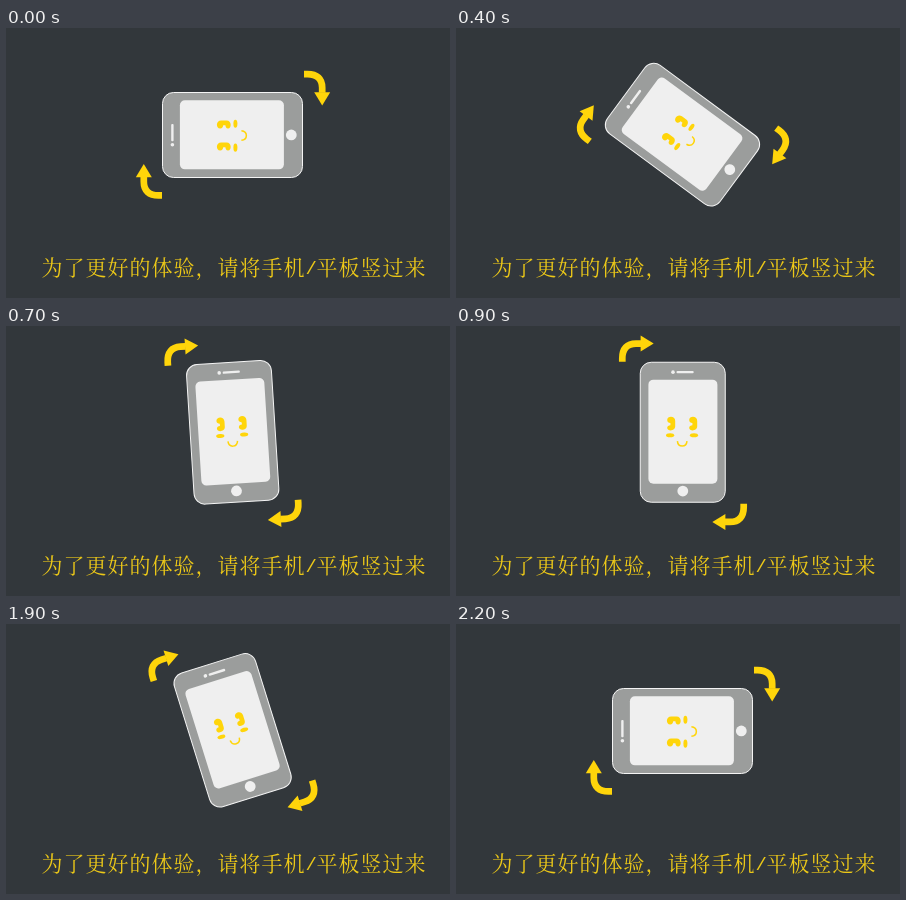
Write an HTML page that moves like this. It is 444 by 270 pixels and loops after 2900 ms.

```html
<!DOCTYPE html>
<html lang="zh-CN">
<head>
<meta charset="utf-8">
<title>请竖屏浏览</title>
<style>
  html, body { margin: 0; width: 100%; height: 100%; overflow: hidden; background: #32373b; }
  svg { display: block; width: 444px; height: 270px; }
  text { font: 300 21px "Noto Serif CJK SC", "Noto Sans CJK SC", "Noto Sans CJK", serif; letter-spacing: 1px; fill: #ecc818; }
  .slash { font: 19px "Liberation Mono", monospace; }
</style>
</head>
<body>
<svg viewBox="0 0 444 270">
  <defs>
    <!-- shapes are drawn around the centre of the upright phone -->
    <g id="arrow">
      <path d="M-60.7 -71V-74.5C-60.7 -84 -56 -89.2 -47 -89.2H-42" fill="none" stroke="#ffd50a" stroke-width="6.7"/>
      <path d="M-42.4 -97.2L-29.3 -89.2L-42.4 -81.2Z" fill="#ffd50a"/>
    </g>
    <path id="eye" d="M-3.8 -3.6C-3.8 -8 4.2 -8.2 4.2 -2.6V2.8C4.2 8 -3.8 8 -3.8 4.2C-3.8 2.4 -2.4 1.8 -.6 1.6V-.6C-2.4 -.8 -3.8 -1.6 -3.8 -3.6Z"/>
    <ellipse id="cheek" rx="4.1" ry="2"/>
  </defs>
  <rect width="444" height="270" fill="#32373b"/>
  <g id="device">
    <use href="#arrow"/>
    <use href="#arrow" transform="rotate(180)"/>
    <rect x="-42.75" y="-70.5" width="85" height="140" rx="11" fill="#9b9d9c" stroke="#f4f4f4"/>
    <rect x="-34.6" y="-53.1" width="69" height="104" rx="5" fill="#efefef"/>
    <g fill="#efefef">
      <circle cx="-10" cy="-60.6" r="1.8"/>
      <rect x="-6.5" y="-61.8" width="17.2" height="2.4" rx="1"/>
      <circle cx="-.2" cy="58.3" r="5.4"/>
    </g>
    <g fill="#ffd50a">
      <use href="#eye" x="-12" y="-9.2"/>
      <use href="#eye" x="10" y="-9.2"/>
      <use href="#cheek" x="-12.9" y="2.4"/>
      <use href="#cheek" x="11" y="2.4"/>
    </g>
    <path d="M-5.6 8.4C-5 15 3.4 15 4 8.4" fill="none" stroke="#ffd50a" stroke-width="1.5"/>
  </g>
  <text x="35.5" y="246.5">为了更好的体验，请将手机</text>
  <text x="299.5" y="246" class="slash">/</text>
  <text x="310.5" y="246.5">平板竖过来</text>
</svg>
<script>
  const LOOP = 2900, STEP = 100, TURN = 600;
  const device = document.getElementById('device');
  const clamp = v => Math.min(1, Math.max(0, v));

  // cubic-bezier(.25, .1, .25, 1)
  function ease(x) {
    if (x <= 0 || x >= 1) return clamp(x);
    let lo = 0, hi = 1, s;
    for (let i = 0; i < 24; i++) {
      s = (lo + hi) / 2;
      if (.75 * s * (1 - s) + s ** 3 < x) lo = s; else hi = s;
    }
    return .3 * s * (1 - s) ** 2 + 3 * s * s * (1 - s) + s ** 3;
  }

  // 0 = lying, 1 = upright; the way back plays the same easing in reverse
  function uprightness(t) {
    if (t >= 2200) return 0;
    return ease(t < 1300 ? (t - 251) / TURN : (2203 - t) / TURN);
  }

  function draw(ms) {
    const t = Math.floor((ms % LOOP) / STEP) * STEP;
    const angle = 90 * (uprightness(t) - 1);
    device.setAttribute('transform', `translate(227 106.75) rotate(${angle})`);
  }

  const start = performance.now();
  function tick() {
    draw(performance.now() - start);
    requestAnimationFrame(tick);
  }
  tick();
</script>
</body>
</html>
```
